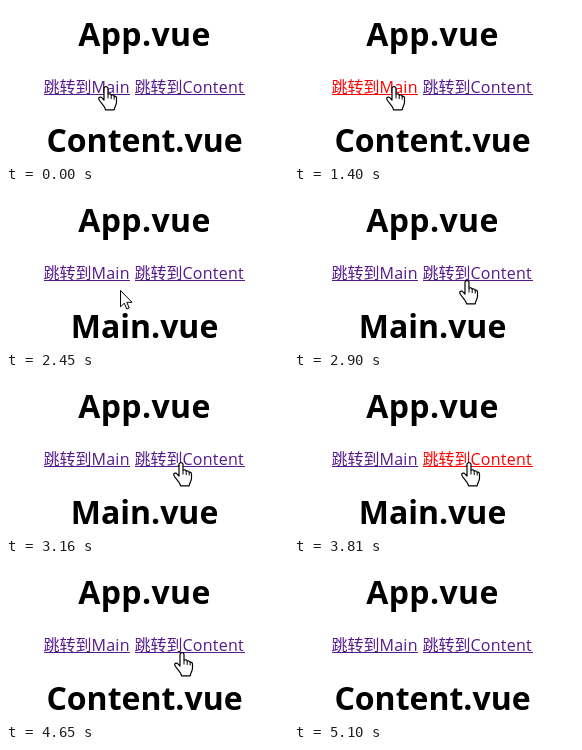
Animation of 282x158 px, one loop 5560 ms. Source, as an HTML page:

```html
<!DOCTYPE html>
<html lang="zh-CN">
<head>
<meta charset="utf-8">
<title>App.vue</title>
<style>
  html, body { margin: 0; width: 100%; height: 100%; overflow: hidden; background: #fff; }
  svg { display: block; width: 100%; height: 100%; }
  .title { font: 700 32px "Open Sans", "Noto Sans", sans-serif; text-anchor: middle; }
  .link { font: 16px "Noto Sans CJK SC", "Noto Sans CJK", sans-serif; fill: #551a8b; }
  .link .latin { font-family: "Open Sans", "Noto Sans", sans-serif; letter-spacing: .25px; }
  .link.active { fill: #f00; }
  .cursor path { fill: #fff; stroke: #000; stroke-linejoin: round; }
</style>
</head>
<body>
<svg viewBox="0 0 282 158">
  <text class="title" x="138.5" y="40" letter-spacing=".4">App.vue</text>

  <g class="link" id="toMain">
    <text x="37.5" y="87">跳转到<tspan class="latin">Main</tspan></text>
    <rect x="38" y="88" width="86" height="1"/>
  </g>
  <g class="link" id="toContent">
    <text x="128.5" y="87">跳转到<tspan class="latin">Content</tspan></text>
    <rect x="129" y="88" width="110" height="1"/>
  </g>

  <text class="title" id="view" x="138.5" y="146">Content.vue</text>

  <!-- Both cursors have their hot spot at the origin -->
  <g class="cursor" id="hand">
    <path stroke-width="1.2" d="M-2 2.5C-2 0 2 0 2 2.5V8.2C3 7.3 5 7.8 5.2 9.2C6.2 8.5 8 9 8.2 10.4C9.3 9.8 10.5 10.6 10.5 12V16C10.5 19 8.6 20.5 8.2 23.8H-.4C-1 20 -7.2 15 -7.3 12.8C-7.4 11 -5 10.5 -4 11.8L-2 14Z"/>
    <path stroke-width="1" d="M2 8.2V12.5M5.2 9.2V13M8.2 10.4V13.5"/>
  </g>
  <g class="cursor" id="arrow">
    <path d="M.5 .5V16.8L4.3 13.2L6.8 19L9.2 18L6.8 12.3H12Z"/>
  </g>
</svg>
<script>
  const LOOP = 5560;
  const $ = id => document.getElementById(id);
  const [toMain, toContent, view, hand, arrow] =
    ["toMain", "toContent", "view", "hand", "arrow"].map($);

  // time, cursor kind, x, y
  const moves = [
    [0, hand, 100, 80],
    [2190, hand, 101, 83],
    [2280, hand, 104, 88],
    [2370, arrow, 109, 95],
    [2450, arrow, 114, 98],
    [2540, arrow, 127, 98],
    [2630, arrow, 148, 96],
    [2720, arrow, 166, 93],
    [2820, hand, 173, 89],
    [2900, hand, 173, 88],
    [2990, hand, 173, 87],
    [3080, hand, 174, 85],
    [3160, hand, 175, 84],
    [4650, hand, 176, 88],
    [4740, arrow, 180, 100],
    [4830, arrow, 186, 116],
    [4920, arrow, 194, 133],
    [5010, arrow, 203, 149],
    [5100, null, 0, 0]
  ];

  const within = (t, from, to) => t >= from && t < to;

  function draw(t) {
    toMain.classList.toggle("active", within(t, 1400, 1480));
    toContent.classList.toggle("active", within(t, 3810, 3880));
    view.textContent = within(t, 1480, 3880) ? "Main.vue" : "Content.vue";

    const [, kind, x, y] = moves.filter(m => m[0] <= t).pop();
    for (const cursor of [hand, arrow]) {
      cursor.setAttribute("visibility", cursor === kind ? "visible" : "hidden");
      cursor.setAttribute("transform", `translate(${x} ${y})`);
    }
  }

  const start = performance.now();
  function tick() {
    draw((performance.now() - start) % LOOP);
    requestAnimationFrame(tick);
  }
  tick();
</script>
</body>
</html>
```
